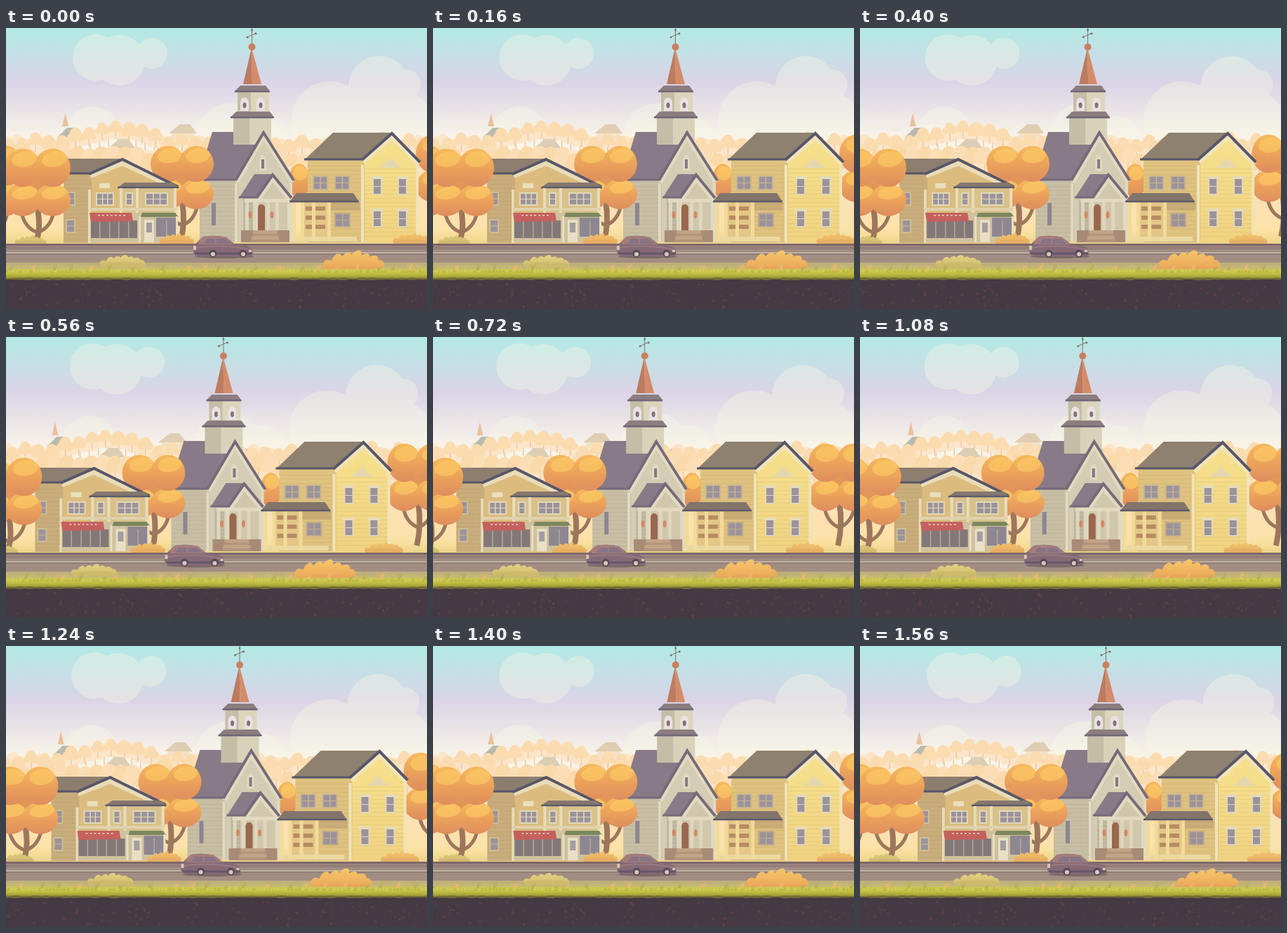
Recreate the animation shown at these times as an HTML page with a canvas. Size 600 by 400 pixels, loop 1600 ms.

```html
<!DOCTYPE html>
<html>
<head>
<meta charset="utf-8">
<title>Autumn street</title>
<style>
html, body { margin: 0; width: 600px; height: 400px; overflow: hidden; }
canvas { display: block; }
</style>
</head>
<body>
<canvas id="stage" width="600" height="400"></canvas>
<script>
const c = document.getElementById('stage').getContext('2d');
const LOOP = 1600, STEP = 40, SWING = 1555, PAN = 49.5;
const LEFT = -10, WIDTH = 680;

let seed;
const rnd = (min = 0, max = 1) => min + (max - min) * (seed = seed * 16807 % 2147483647) / 2147483647;

function rect(fill, x, y, w, h) { c.fillStyle = fill; c.fillRect(x, y, w, h); }
function band(fill, y, h) { rect(fill, LEFT, y, WIDTH, h); }
function shape(fill, d) { c.fillStyle = fill; c.fill(new Path2D('M' + d + 'Z')); }
function line(color, width, d) {
  c.strokeStyle = color;
  c.lineWidth = width;
  c.stroke(new Path2D('M' + d));
}
function oval(fill, x, y, rx, ry = rx, turn = 0) {
  c.fillStyle = fill;
  c.beginPath();
  c.ellipse(x, y, rx, ry, turn, 0, 7);
  c.fill();
}
function fade(y0, y1, ...colors) {
  const g = c.createLinearGradient(0, y0, 0, y1);
  colors.forEach((color, i) => g.addColorStop(i / (colors.length - 1), color));
  return g;
}

function cloud(...puffs) {
  c.fillStyle = 'rgba(244,244,228,.4)';
  c.beginPath();
  for (const [x, y, r] of puffs) {
    c.moveTo(x + r, y);
    c.arc(x, y, r, 0, 7);
  }
  c.fill();
}
function clouds() {
  cloud([128, 42, 33], [162, 46, 36], [208, 36, 22]);
  cloud([532, 84, 44], [570, 80, 21], [462, 131, 55], [550, 150, 65]);
  cloud([123, 152, 40], [320, 155, 48], [365, 165, 40]);
}

function farTree(x, y, r, color) {
  rect('#eccba5', x - .5, y, 1.5, r * 2.4);
  oval(color, x, y, r, r * 1.15);
  for (const side of [-1, 1]) oval(color, x + side * r * .7, y + r * .5, r * .7);
}
function farHouse(x, y, w, roof) {
  rect('#f4e2c6', x + 4, y, w - 8, 12);
  shape(roof, `${x},${y + 4} ${x + w * .4},${y - 9} ${x + w * .75},${y - 9} ${x + w},${y + 4}`);
}
function hills() {
  seed = 77;
  const ridge = x => 162 - 16 * Math.exp(-(((x - 160) / 60) ** 2));
  for (let x = LEFT; x < 660; x += 13) farTree(x, ridge(x) + rnd(0, 8), rnd(7, 10), '#fce5c9');
  band(fade(172, 305, '#fde7cd', '#fde0b7', '#fbe3a3'), 174, 140);
  shape('#eac19a', '84.5,121 80,140 89,140');
  farHouse(74, 151, 32, '#b9baae');
  farHouse(146, 167, 38, '#dccdb5');
  farHouse(232, 146, 40, '#dfceb3');
  farHouse(345, 168, 30, '#dacbb4');
  for (let x = 4; x < 660; x += 19) farTree(x, ridge(x) + rnd(-6, 6), rnd(7, 9), '#fbdcb0');
  for (let x = 0; x < 660; x += 17) farTree(x, rnd(178, 192), rnd(8, 12), x % 2 ? '#fbdeb6' : '#fad9aa');
}

function leaves(x, y, rx, ry) {
  oval(fade(y - ry, y + ry, '#f6b95c', '#eba25b', '#de8d5d'), x, y, rx, ry);
  oval('rgba(255,206,103,.6)', x + rx * .1, y - ry * .45, rx * .7, ry * .4, -.15);
}
function tree(x, y, w, h, ground = 303) {
  const fork = y + h * .55;
  line('#9d765c', 8, `${x},${fork - 20}Q${x + 5},${fork + 10} ${x - 2},${ground}`);
  for (const side of [-1, 1])
    line('#9d765c', 5, `${x},${fork + 14}Q${x + side * w * .2},${fork + 8} ${x + side * w * .25},${fork - 15}`);
  oval('#e29759', x, y, w * .35, h * .35);
  for (const row of [.23, -.23])
    for (const side of [-1, 1])
      leaves(x + side * w * .23, y + row * h, w * .28, h * (.25 - row * .1));
}
function bush(x, y, w, h, top, low) {
  for (let i = 0; i < 7; i++) {
    const k = i / 6, r = h * (.3 + .28 * Math.sin(k * Math.PI) + i % 2 * .05);
    oval(fade(y - h, y, top, low), x + w * (.08 + .84 * k), y - r * .7, w * .09, r, .2 + k * .8);
  }
  oval(low, x + w / 2, y - 2, w * .5, 3.5);
}

function boards(x, w, y0, y1) {
  for (let y = y0; y < y1; y += 6) rect('rgba(130,90,50,.1)', x, y, w, 1);
}
function pane(x, y, w, h, cols = 1, frame = '#e2d8b9') {
  rect(frame, x - 2, y - 2, w + 4, h + 4);
  rect('#9b939b', x, y, w, h);
  for (let i = 1; i < cols; i++) rect(frame, x + w * i / cols - .5, y, 1.5, h);
  rect(frame, x, y + h / 2 - .5, w, 1);
}
function posts(color, xs, y, w, h) {
  for (const x of xs) rect(color, x, y, w, h);
}

// Side wall, roof plane and gabled front; `inside` runs before the front goes up.
function gable({ back, ridge, left, apex, right, top, eave, low = eave, base, wall, colors, trim, inside }) {
  const [roof, edge, side, front] = colors;
  rect(side, wall, eave, left + 6 - wall, base - eave);
  boards(wall, left - wall, eave + 8, base);
  shape(roof, `${back},${eave} ${ridge},${top} ${apex},${top} ${left},${eave}`);
  line(edge, 3, `${back},${eave - 1}H${left}`);
  if (inside) inside();
  shape(front, `${apex},${top} ${left + 4},${eave} ${left + 4},${base} ${right - 4},${base} ${right - 4},${low}`);
  line(trim, 6, `${left + 2},${eave + 3}L${apex},${top + 7}L${right - 2},${low + 3}`);
  line(edge, 4, `${left},${eave}L${apex},${top + 1}L${right},${low}`);
  posts(trim, [left - 1, right - 6], low + 4, 4, base - low - 4);
}
function lowRoof(left, right, top, eave, roof) {
  shape(roof, `${left},${eave} ${left + 10},${top} ${right - 8},${top} ${right},${eave}`);
  line('#5d5a69', 2.5, `${left},${eave}H${right}`);
}

function shopHouse() {
  gable({
    back: 69, ridge: 88, left: 118, apex: 166, right: 245, top: 186, eave: 208, low: 226, base: 306, wall: 82,
    colors: ['#8d7e70', '#57566a', '#c8ad7b', '#dcbc7e'], trim: '#e8dcb9'
  });
  for (const y of [235, 274]) pane(87, y, 10, 16, 1, '#cfbd93');
  rect('#eadfbd', 133, 221, 15, 7);
  rect('#d8c18a', 163, 228, 78, 36);
  pane(130, 236, 22, 15, 3);
  pane(172, 236, 7, 15);
  pane(200, 236, 29, 15, 3);
  lowRoof(159, 246, 220, 227, '#84776f');
  posts('#e7dcba', [162, 185, 239], 228, 4, 35);
  rect('#e0d2ae', 118, 256, 126, 4);
  rect('#d0c19e', 120, 263, 122, 42);
  rect('#827878', 121, 274, 66, 25);
  rect('#8e8791', 214, 270, 28, 27);
  posts('#b8a799', [133, 147, 160, 174, 228], 274, 1.5, 26);
  rect('#e8dfc6', 197, 273, 14, 32);
  rect('#a29da0', 200, 277, 8, 14);
  shape('#c4615e', '119,263 179,263 181,275 121,276');
  for (let x = 131; x < 170; x += 6) rect('#efd2b9', x, 266, 3, 1.5);
  shape('#7b885f', '194,263 241,263 246,269 192,269');
  posts('#e9dec0', [189, 242], 268, 3, 37);
}

function cornice(y, roof, spread) {
  shape(roof, `${351 - spread},${y} ${359 - spread},${y - 8} ${345 + spread},${y - 8} ${351 + spread},${y}`);
  rect('#6f6575', 351 - spread, y - 1, spread * 2, 2.5);
}
function tower() {
  rect('#c5bea7', 324, 126, 24, 40);
  rect('#d9d2b9', 347, 126, 31, 40);
  rect('#c5bea7', 330, 88, 20, 31);
  rect('#dcd5bc', 349, 88, 26, 31);
  for (const x of [340, 363]) {
    oval('#e9e1e4', x, 107, 6, 8);
    rect('#e9e1e4', x - 6, 107, 12, 11);
    oval('#857273', x, 110, 2.5, 4);
  }
  cornice(127, '#8b7d80', 31);
  cornice(90, '#8b7d80', 25);
  shape('#bd7b60', '350,28 338,80 351,80');
  shape('#d38c6a', '350,28 351,80 364,80');
  line('#80706a', 1, '350.5,0V24M344,13L357,7');
  for (const [x, y] of [[350.5, 3], [344, 13], [356, 8]]) oval('#80706a', x, y, 1.5);
  oval('#cb7f60', 350.5, 27, 5);
}

function church() {
  const stone = '#e2dac0', purple = '#887b87', edge = '#766a7a';
  gable({
    back: 273, ridge: 294, left: 327, apex: 367, right: 410, top: 148, eave: 217, base: 304, wall: 276,
    colors: [purple, edge, '#c7bea5', '#d4ccb3'], trim: stone, inside: tower
  });
  rect('#8d8690', 293, 249, 6, 32);
  oval(stone, 366, 190, 5, 9);
  rect(stone, 361, 190, 10, 13);
  rect('#817a87', 364, 187, 4, 13);
  gable({
    back: 332, ridge: 354, left: 357, apex: 380, right: 407, top: 208, eave: 242, base: 290, wall: 338,
    colors: [purple, edge, '#c0b8a1', '#d0c7ad'], trim: stone
  });
  rect(stone, 340, 243, 63, 5);
  posts('#ded6bd', [341, 352, 371, 384], 248, 5, 41);
  oval('#99684f', 364, 256, 5, 5);
  rect('#99684f', 359, 256, 10, 33);
  for (const x of [348, 379]) oval('#d48863', x, 266, 2.5, 5);
  posts('#a78b76', [335, 386], 288, 18, 17);
  for (let i = 0; i < 4; i++) rect(i % 2 ? '#b3947a' : '#c2a386', 352 - i, 288 + i * 4.3, 35 + i * 2, 4.3);
}

function yellowHouse() {
  gable({
    back: 425, ridge: 466, left: 507, apex: 550, right: 590, top: 149, eave: 188, low: 191, base: 305, wall: 430,
    colors: ['#8f8170', '#57566b', '#dfc27f', fade(160, 305, '#f6e08c', '#f0d381')], trim: '#f0e4b8'
  });
  boards(511, 74, 200, 302);
  shape('#e3d7b0', '533,199 548,185 563,199');
  for (const x of [439, 470]) pane(x, 212, 18, 17, 2, '#c8b591');
  for (const x of [524, 560])
    for (const y of [215, 261]) {
      pane(x, y, 10, 21);
      rect('#e6dbb8', x - 4, y - 4, 18, 4);
    }
  pane(470, 265, 19, 17, 2, '#c0ac89');
  rect('#e3c688', 424, 248, 38, 53);
  for (const y of [254, 267, 280])
    for (const x of [427, 441]) rect('#b78c62', x, y, 14, 6);
  rect('rgba(120,90,90,.2)', 462, 248, 42, 12);
  rect('#ead8a2', 408, 297, 92, 7);
  posts('#f2da99', [408, 420, 436, 458], 248, 5, 56);
  lowRoof(404, 503, 235, 247, '#81756c');
}

function car() {
  oval('rgba(70,50,60,.4)', 311, 325, 42, 3);
  shape('#856a76', '267,320V310L281,297Q298,294 314,298L327,308Q345,309 350,314L352,322L346,325H274');
  shape('#a47d7b', '273,304L281,297Q298,294 314,298L326,308L275,308');
  shape('#877484', '282,307L287,300H312L321,307');
  line('#a47d7b', 2, '299,299V308');
  line('#9a7980', 2, '268,313Q310,307 350,316');
  rect('#d8c4b4', 267, 310, 4, 6);
  rect('#dfc9ae', 346, 316, 4, 3);
  line('#66566a', 3, '269,321H351');
  for (const x of [295, 338]) {
    oval('#5b4c59', x, 321, 5.5);
    oval('#d9c9bd', x, 322, 3);
  }
}

function road() {
  band('#a28d82', 307, 29);
  band('#7d6769', 307, 3);
  band('#957f79', 311, 4);
  band('#bfb1a1', 319, 2);
  band('#927d79', 321, 2);
}

function blade(color, x, y, h, lean) {
  shape(color, `${x - 1.5},${y}Q${x},${y - h / 2} ${x + lean},${y - h}Q${x + lean * .7 + 1},${y - h / 2} ${x + 2},${y}`);
}
function verge() {
  seed = 4242;
  band('#bfae7d', 334, 10);
  for (let x = LEFT; x < 670; x += 9) oval('#c6b873', x, 343, 8, rnd(3, 6));
  bush(134, 339, 65, 16, '#e6d283', '#cdbb6c');
  bush(452, 344, 86, 28, '#f8c76a', '#e9a659');
  band(fade(343, 358, '#cec853', '#bfbc40', '#8f8834'), 343, 15);
  for (let x = LEFT; x < 670; x += 5) blade(rnd() < .5 ? '#d3cc60' : '#bab64a', x, 348, rnd(3, 7), 1);
  for (let x = 4; x < 670; x += 27) {
    const tx = x + rnd(0, 14), h = rnd(5, 12), color = rnd() < .35 ? '#e6ba6b' : '#b9b05e';
    for (const lean of [-5, 0, 5]) blade(color, tx, 345, h, lean);
  }
  band('#453943', 358, 42);
  for (let x = LEFT; x < 670; x += 14) oval('#736b35', x, 357, 9, rnd(1, 2));
  for (let i = 0; i < 130; i++)
    oval(rnd() < .5 ? '#5a4046' : '#4f3e47', rnd(LEFT, 670), rnd(364, 399), rnd(1, 3), rnd(1, 2.2), rnd(0, 3));
}

function street() {
  band(fade(285, 308, 'rgba(246,220,142,0)', '#e8d18b'), 285, 23);
  leaves(418, 218, 15, 25);
  church();
  tree(251, 215, 88, 94);
  shopHouse();
  tree(-17, 220, 76, 104);
  tree(45, 222, 92, 100);
  tree(628, 202, 86, 100, 297);
  yellowHouse();
  bush(13, 308, 44, 13, '#dccb78', '#d1b86f');
  bush(219, 307, 48, 15, '#f3c069', '#e6ac62');
  bush(552, 307, 54, 15, '#f3c46c', '#e4af65');
  road();
  car();
  verge();
}

function layer(draw, shift) {
  c.save();
  c.translate(shift, 0);
  draw();
  c.restore();
}

function frame() {
  const t = Math.min(Math.floor(performance.now() % LOOP / STEP) * STEP, SWING);
  const pan = -PAN * (1 - Math.cos(2 * Math.PI * t / SWING)) / 2;
  rect(fade(0, 155, '#b2eae5', '#dad4e6', '#f9f3e9'), 0, 0, 600, 400);
  layer(clouds, pan * .1);
  layer(hills, pan * .36);
  layer(street, pan);
  requestAnimationFrame(frame);
}
frame();
</script>
</body>
</html>
```
